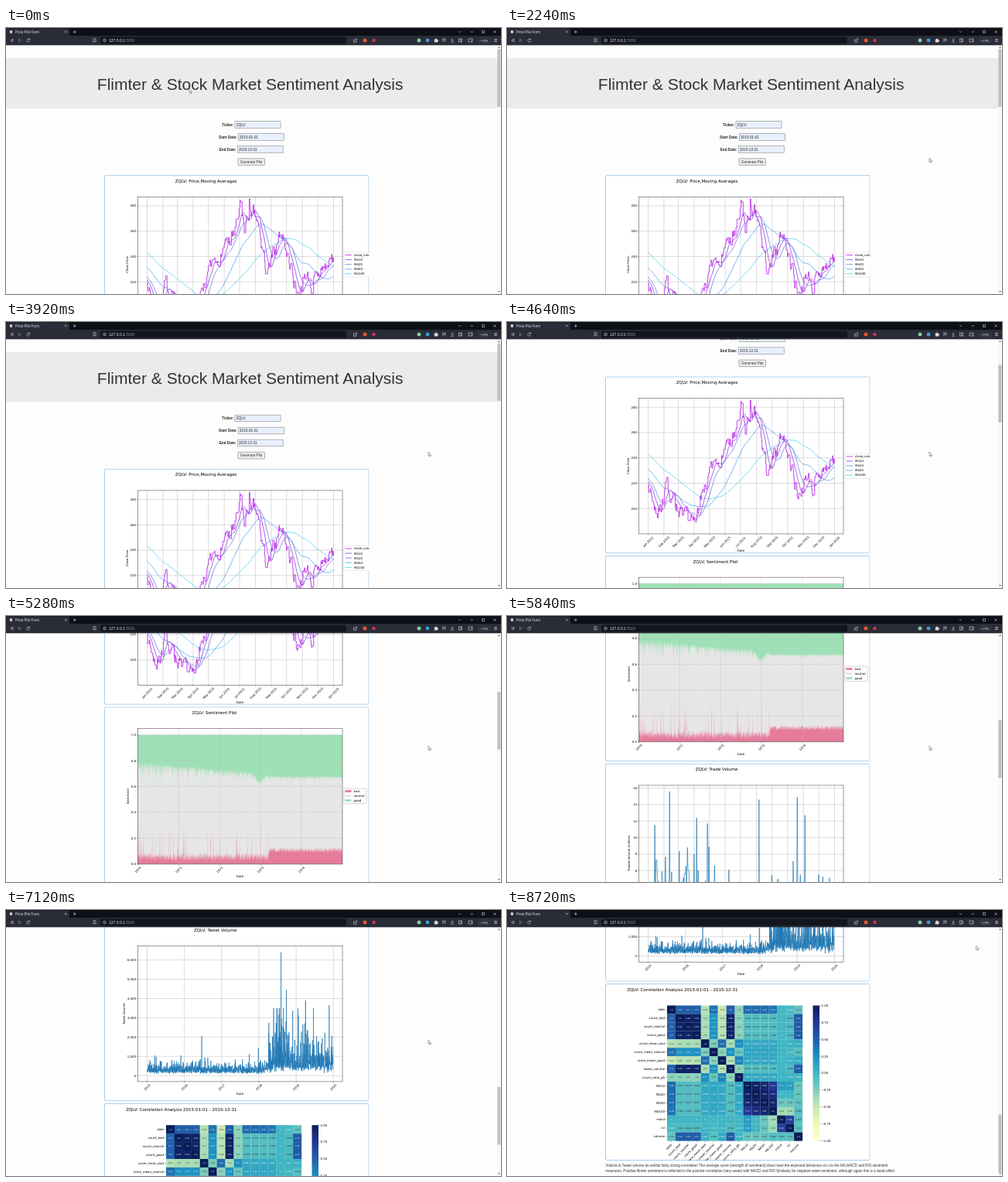
Write an HTML page that moves like this. It is 640 px wide and 344 px high and loops after 8800 ms.

```html
<!DOCTYPE html>
<html lang="en">
<head>
<meta charset="utf-8">
<title>Price Plot Form</title>
<style>
  @property --scroll { syntax: "<number>"; inherits: true; initial-value: 0; }
  html, body { margin: 0; width: 100%; height: 100%; overflow: hidden; background: #fdfdfd; }
  svg { display: block; width: 640px; height: 344px; animation: scroll 8.8s linear infinite; }
  text { font-family: "Liberation Sans", Arial, sans-serif; white-space: pre; }
  .plot text { font-family: "DejaVu Sans", sans-serif; }
  #page { transform: translateY(calc(var(--scroll) * -1px)); }
  #thumb { transform: translateY(calc(var(--scroll) * .2325px)); }
  #cursor { animation: cursor 8.8s linear infinite; }
  .line { fill: none; stroke-linejoin: round; }
  @keyframes scroll {
    0%, 25.8% { --scroll: 0; animation-timing-function: ease-in-out; }
    34.8% { --scroll: 240; animation-timing-function: ease-in-out; }
    44.55% { --scroll: .5; animation-timing-function: cubic-bezier(.3, 0, .6, .5); }
    60% { --scroll: 304; }
    66.36% { --scroll: 462; }
    80.91% { --scroll: 866; }
    86.4%, 100% { --scroll: 1021; }
  }
  @keyframes cursor {
    0%, 1.8% { transform: translate(237px, 78.5px); animation-timing-function: ease-in-out; }
    9.1%, 11.4% { transform: translate(420px, 140px); animation-timing-function: ease-in-out; }
    15%, 91% { transform: translate(546px, 168px); animation-timing-function: ease-in-out; }
    99%, 100% { transform: translate(606.5px, 46px); }
  }
</style>
</head>
<body>
<svg viewBox="0 0 640 344">
  <rect width="640" height="344" fill="#fdfdfd"/>
  <g id="page"></g>

  <rect x="635" y="22" width="5" height="322" fill="#f8f8f8"/>
  <rect id="thumb" x="635.3" y="27.5" width="4.2" height="74.5" fill="#c1c1c1"/>
  <path d="M636 26l1.5-2 1.5 2zM636 340l1.5 2 1.5-2z" fill="#777"/>

  <g id="browser">
    <rect width="640" height="22.3" fill="#2a2c38"/>
    <rect width="640" height="10" fill="#0e1017"/>
    <path d="M0 10V2q0-1.5 1.5-1.5h79q1.5 0 1.5 1.5v8z" fill="#2a2c38"/>
    <rect x="122" y="11.6" width="318" height="8.8" rx="1.5" fill="#14161e"/>
    <circle cx="6.5" cy="5" r="1.9" fill="#ccd0d6"/>
    <text x="12" y="6.8" font-size="4.5" fill="#e4e6ea">Price Plot Form</text>
    <text x="133" y="17.8" font-size="5" fill="#eceef2">127.0.0.1<tspan fill="#868b94">:5000</tspan></text>
    <g fill="none" stroke="#d5d8de" stroke-width=".6">
      <path d="M76 3.7l2.5 2.5m0-2.5l-2.5 2.5M86.7 5h4.2m-2.1-2.1v4.2"/>
      <path d="M9 14v4l-3.2-2z"/>
      <path d="M16.5 14v4l3.2-2z" stroke="#8b909a"/>
      <path d="M30.5 15a2 2 0 1 0 .2 1.8m0-3.3v1.7H29"/>
      <path d="M113 13.8h3v4.4l-1.5-1.2-1.5 1.2z"/>
      <circle cx="127.5" cy="16" r="1.9"/><path d="M127.5 15.6v1.4"/>
      <path d="M451 15h-1.5v3.2h3.5v-2M451 16.5l2.5-2.5h-1.5m1.5 0v1.5"/>
      <path d="M564 14h4m-4 1.7h4m-4 1.7h2.2M568 14v3.4"/>
      <path d="M577 13.5v3m-1.4-1.3l1.4 1.4 1.4-1.4M574.8 18.2h4.4"/>
      <rect x="585.5" y="14" width="4" height="4"/><path d="M588 14v4"/>
      <rect x="598" y="14" width="5" height="4"/><path d="M601 16h2"/>
      <rect x="610.5" y="13" width="16" height="6" rx="2.5" stroke="#4b505a"/>
      <path d="M631 14.5h4m-4 1.5h4m-4 1.5h4"/>
      <path d="M585 4.2l1.5 1.5 1.5-1.5M600.5 5h3.5M615.5 3.5h3v3h-3zM630.5 3.5l3 3m0-3l-3 3"/>
    </g>
    <text x="612.5" y="17.5" font-size="4" fill="#e4e6ea">• VPN</text>
    <circle cx="464" cy="16" r="2.5" fill="#e8562e"/>
    <circle cx="475.5" cy="16" r="2.3" fill="#c63a4a"/>
    <circle cx="534" cy="16" r="2.5" fill="#86c9a0"/>
    <circle cx="545" cy="16" r="2.4" fill="#3e9bd8"/>
    <path d="M553.8 14.6h1.3a.8.8 0 1 1 1.5 0h1.4v1.2a.8.8 0 1 1 0 1.3v1.3h-4.2z" fill="#d5d8de"/>
  </g>
  <path id="cursor" d="M0 0v5.4l1.3-1.1.9 1.9.8-.4-.9-1.8h1.7z" fill="#fff" stroke="#222" stroke-width=".4"/>
</svg>

<script>
const LEFT = 170.5, RIGHT = 435, TOP = 27.4, BOTTOM = 202.7;
const DATA_LEFT = 182.5, YEAR = 241;
const TICKER = "ZQLV";
const BLUE = "#1f77b4";

let seed = 7;
function random() {
  seed = (seed + 0x6D2B79F5) | 0;
  let t = Math.imul(seed ^ (seed >>> 15), 1 | seed);
  t = (t + Math.imul(t ^ (t >>> 7), 61 | t)) ^ t;
  return ((t ^ (t >>> 14)) >>> 0) / 4294967296;
}
const burst = () => -Math.log(1 - random());
const clamp = (v, min, max) => Math.min(max, Math.max(min, v));
const range = (n, f) => Array.from({ length: n }, (_, i) => f(i));

function interpolate(points, x) {
  const i = clamp(points.findIndex(p => p[0] > x), 1, points.length - 1);
  const [[x0, y0], [x1, y1]] = x >= points.at(-1)[0] ? points.slice(-2) : [points[i - 1], points[i]];
  return y0 + (y1 - y0) * (x - x0) / (x1 - x0);
}

const text = (x, y, s, size = 3.93, attrs = "") =>
  `<text x="${x}" y="${y}" font-size="${size}" ${attrs}>${s}</text>`;
const turned = (x, y, s, angle, anchor = "middle") =>
  text(0, 1.4, s, 3.93, `text-anchor="${anchor}" transform="translate(${x} ${y}) rotate(${angle})"`);
const rect = (x, y, w, h, fill, attrs = "") =>
  `<rect x="${x}" y="${y}" width="${w}" height="${h}" fill="${fill}" ${attrs}/>`;
const stroke = (d, color, width, attrs = "") =>
  `<path class="line" d="${d}" stroke="${color}" stroke-width="${width}" ${attrs}/>`;
const polyline = pts => "M" + pts.map(([x, y]) => x.toFixed(2) + " " + y.toFixed(2)).join("L");

function card(index, title, content) {
  return `<g class="plot" transform="translate(0 ${191 + 231.5 * index})" clip-path="url(#card)">
    ${rect(127.5, -.3, 341.5, 227.8, "#fff", 'rx="1.5" stroke="#7fb8ee" stroke-width=".7"')}
    ${text(298.5, 8.9, `${TICKER}: ${title}`, 5.5, 'text-anchor="end"')}${content}</g>`;
}

function axes({ xTicks, yTicks, yLabel, labelX = 157, xTickY, dateY, under = "", over = "", dash = "" }) {
  const grid = xTicks.map(([x]) => `M${x} ${TOP}V${BOTTOM}`).join("") +
               yTicks.map(([y]) => `M${LEFT} ${y}H${RIGHT}`).join("");
  const marks = xTicks.map(([x]) => `M${x} ${BOTTOM}v1.4`).join("") +
                yTicks.map(([y]) => `M${LEFT} ${y}h-1.4`).join("");
  return under + stroke(grid, "#b8b8b8", .5, `stroke-dasharray="${dash}"`) +
    `<g clip-path="url(#axes)">${over}</g>` + stroke(marks, "#222", .4) +
    rect(LEFT, TOP, RIGHT - LEFT, BOTTOM - TOP, "none", 'stroke="#333" stroke-width=".5"') +
    xTicks.map(([x, s]) => turned(x, xTickY, s, -45)).join("") +
    yTicks.map(([y, s]) => text(168, y + 1.4, s, 3.93, 'text-anchor="end"')).join("") +
    turned(labelX, 115, yLabel, -90) + text(302.5, dateY, "Date", 3.93, 'text-anchor="middle"');
}

const dayX = d => DATA_LEFT + YEAR * d / 365;
const isWeekend = d => [2, 3].includes((d + 154) % 7);
const months = range(13, m => {
  const date = new Date(Date.UTC(2015, m, 1));
  const day = (date - Date.UTC(2015, 0, 1)) / 864e5;
  const name = date.toLocaleString("en", { month: "short", timeZone: "UTC" });
  return [+dayX(day).toFixed(2), `${name} ${date.getUTCFullYear()}`];
});

function priceChart() {
  const turns = [[-150, 269], [0, 219], [18, 195], [37, 218], [67, 194], [88, 187], [131, 238], [170, 257],
    [182, 278], [190, 259], [200, 280], [216, 264], [235, 224], [262, 262], [294, 210], [312, 226],
    [322, 215], [340, 229], [365, 238]];
  const history = 150, close = [];
  let wobble = 0;
  for (let d = -history; d <= 365; d++) {
    if (d > 0) wobble = wobble * .65 + (random() - .5) * 10;
    close.push(isWeekend(d) && close.length ? close.at(-1) : interpolate(turns, d) + wobble);
  }
  const y = v => 39 + (280 - v) * 1.637;
  const average = n => polyline(range(366, d => {
    const part = close.slice(d + history - n + 1, d + history + 1);
    return [dayX(d), y(part.reduce((a, b) => a + b) / n)];
  }));
  const steps = `M${DATA_LEFT} ${y(219)}` +
    range(366, d => `H${dayX(d).toFixed(2)}V${y(close[d + history]).toFixed(2)}`).join("");
  const series = [["close_value", "#b31be8", steps], ["MA10", "#8a3fdc", average(15)],
    ["MA20", "#6f74e4", average(29)], ["MA50", "#4a9fee", average(73)], ["MA100", "#45cdf0", average(145)]];
  const legend = rect(437, 99, 40, 32, "#fff", 'stroke="#ccc" stroke-width=".4"') +
    series.map(([name, color], i) => stroke(`M438.5 ${102.6 + i * 6.05}h8.5`, color, .8) +
      text(450, 104 + i * 6.05, name)).join("");
  return axes({
    xTicks: months, yTicks: range(5, i => [39 + i * 32.75, 280 - 20 * i]), yLabel: "Close Price",
    xTickY: 213, dateY: 226, over: series.map(([, color, d]) => stroke(d, color, .8)).reverse().join("")
  }) + legend;
}

function sentimentChart() {
  const y = v => 202.5 - v * 167;
  const good = [], bad = [];
  for (let x = LEFT; x <= RIGHT; x += .15) {
    const t = (x - LEFT) / (RIGHT - LEFT), calm = t > .64;
    const wild = calm ? .012 : .04 - .03 * t;
    const dip = .06 * Math.exp(-(((x - 328) / 6) ** 2));
    const level = calm ? .68 : .79 - .14 * t;
    good.push([x, y(level - dip - burst() * wild)]);
    const spike = !calm && random() < .07 * (1 - t) ? random() * .3 : 0;
    bad.push([x, y((calm ? .085 : .02) + random() * (calm ? .045 : .07) + spike)]);
  }
  const area = (pts, edge) => `${polyline(pts)}L${RIGHT} ${edge}H${LEFT}z`;
  const under = rect(LEFT, 35.5, RIGHT - LEFT, 167, "#e6e6e6") +
    `<path d="${area(good, 35.5)}" fill="#9fe0b6"/><path d="${area(bad, 202.5)}" fill="#e67b9b"/>`;
  const entries = [["bad", "#e67b9b"], ["neutral", "#e6e6e6"], ["good", "#9fe0b6"]];
  return axes({
    under, dash: "2 1", xTicks: range(5, i => [LEFT + i * 52.85, 1970 + i]),
    yTicks: range(6, i => [y(i / 5), (i / 5).toFixed(1)]), yLabel: "Sentiment", labelX: 157.5,
    xTickY: 210, dateY: 219.8
  }) + rect(437, 105, 29, 19.5, "#fff", 'rx="1" stroke="#aaa" stroke-width=".5"') +
    entries.map(([name, color], i) => rect(438.5, 107 + i * 6, 8, 2.8, color) +
      text(449.5, 109.8 + i * 6, name)).join("");
}

const peakAt = (peaks, x, reach) => peaks.find(([px]) => Math.abs(px - x) <= reach)?.[1] ?? 0;

function tradeChart() {
  const peaks = [[190.8, 11.5], [210, 15.6], [245, 12.4], [259, 11.7], [325.8, 14.6], [375.2, 14.9], [385, 12.7]];
  const y = v => 31 + (16 - v) * 10.67;
  let base = 3;
  const points = range(365, d => {
    const busy = d < 130 ? 1.5 : 1;
    if (!isWeekend(d)) base = Math.min(10, 1.8 + burst() * 1.1 * busy);
    return [dayX(d), y(Math.max(base, peakAt(peaks, dayX(d), .34)))];
  });
  return axes({
    xTicks: months, yTicks: range(9, i => [y(i * 2), i * 2]), yLabel: "Traded Volume (million)",
    labelX: 158, xTickY: 213, dateY: 226, over: stroke(polyline(points), BLUE, .7)
  });
}

function postChart() {
  const peaks = [[253, 2050], [355.6, 6400], [362.5, 4450], [387.3, 3900], [417.8, 3650]];
  const y = v => 195 - v * .02492;
  const points = [];
  for (let x = DATA_LEFT; x <= 423; x += .14) {
    const rise = clamp((x - 329) / 18, 0, 1);
    const hype = 1 + .5 * Math.exp(-(((x - 358) / 8) ** 2));
    const v = 90 + 250 * random() + rise * 350 * random() + burst() ** 1.3 * (90 + 270 * rise) * hype;
    points.push([x, y(Math.max(Math.min(v, 3500), peakAt(peaks, x, .07)))]);
  }
  return axes({
    xTicks: range(6, i => [DATA_LEFT + i * 48.15, 2015 + i]),
    yTicks: range(7, i => [y(i * 1000), (i * 1000).toLocaleString("en")]), yLabel: "Tweet Volume",
    labelX: 152.5, xTickY: 210, dateY: 219.8, over: stroke(polyline(points), BLUE, .65)
  });
}

function correlationChart() {
  // weights on activity, price trend, momentum and drift over time
  const counts = [.97, -.08];
  const factors = {
    date: [.55, .45, 0, .6], count_bad: counts, count_neutral: counts, count_good: counts,
    score_mean_bad: [-.4, .1, 0, -.45], score_mean_neutral: [.26, .12, 0, .35],
    score_mean_good: [-.45, .1, 0, -.55], tweet_volume: counts, count_ratio_gb: [-.3, .1, 0, -.3],
    MA10: [0, .97, .2], MA20: [0, .98], MA50: [0, .96, -.2], MA100: [0, .85, -.45],
    macd: [0, 0, .85], rsi: [-.05, 0, .8], volume: [.52, -.15, -.1, -.6]
  };
  const names = Object.keys(factors);
  const correlation = (a, b) => a === b ? 1
    : factors[a].reduce((sum, w, i) => sum + w * (factors[b][i] ?? 0), 0);
  const stops = ["ffffd9", "edf8b1", "c7e9b4", "7fcdbb", "41b6c4", "1d91c0", "225ea8", "253494", "081d58"];
  const channels = hex => [0, 2, 4].map(i => parseInt(hex.slice(i, i + 2), 16));
  const color = v => {
    const t = (v + 1) * 4, i = Math.min(7, Math.floor(t)), a = channels(stops[i]), b = channels(stops[i + 1]);
    return `rgb(${a.map((c, k) => Math.round(c + (b[k] - c) * (t - i)))})`;
  };
  const x0 = 207, y0 = 27.5, size = 10.94;
  let out = "";
  names.forEach((name, r) => {
    const middle = y0 + (r + .5) * size, center = x0 + (r + .5) * size;
    out += text(204, middle + 1.3, name, 3.93, 'text-anchor="end"') + turned(center, 207, name, -45, "end") +
      stroke(`M207 ${middle}h-1.5M${center} 202.5v1.5`, "#222", .4);
    names.forEach((other, c) => {
      const v = correlation(name, other);
      const label = v === 1 ? "1.0" : +v.toFixed(Math.abs(v) < .1 ? 3 : 2);
      out += rect(x0 + c * size, y0 + r * size, size + .1, size + .1, color(v)) +
        text(x0 + (c + .5) * size, middle + .9, label, 2.6,
          `text-anchor="middle" fill="${v < -.03 ? "#262626" : "#fff"}"`);
    });
  });
  const gradient = stops.map((s, i) => `<stop offset="${i / 8}" stop-color="#${s}"/>`).join("");
  return out + `<linearGradient id="scale" x1="0" y1="1" x2="0" y2="0">${gradient}</linearGradient>` +
    rect(395.5, y0, 8.5, 175, "url(#scale)") +
    range(9, i => stroke(`M404 ${y0 + i * 21.875}h1.4`, "#222", .4) +
      text(406.5, y0 + 1.4 + i * 21.875, (1 - i / 4).toFixed(2).replace("-", "−"))).join("");
}

function formRow(label, value, x, y) {
  return text(x - 1.7, y + 6.2, label, 4.67, 'text-anchor="end" font-weight="bold" fill="#222"') +
    rect(x, y, 59, 8.6, "#e8f0fe", 'stroke="#858585" stroke-width=".6"') +
    text(x + 1.7, y + 6.1, value, 4.67, 'fill="#222"');
}

document.getElementById("page").innerHTML = `
  <clipPath id="axes">${rect(LEFT, TOP, RIGHT - LEFT, BOTTOM - TOP, "#000")}</clipPath>
  <clipPath id="card">${rect(127, -1, 342.4, 229, "#000")}</clipPath>
  ${rect(0, 39, 635, 65, "#ebebeb")}
  ${text(513.5, 80.3, "Flimter &amp; Stock Market Sentiment Analysis", 21, 'text-anchor="end" fill="#333"')}
  ${formRow("Ticker:", TICKER, 296, 120.7)}
  ${formRow("Start Date:", "2015-01-01", 300.3, 136.7)}
  ${formRow("End Date:", "2015-12-31", 299.2, 152.6)}
  ${rect(300, 168.8, 34.5, 8.6, "#efefef", 'rx=".8" stroke="#777" stroke-width=".6"')}
  ${text(317.2, 174.7, "Generate Plot", 4.67, 'text-anchor="middle" fill="#333"')}
  ${card(0, "Price,Moving Averages", priceChart())}
  ${card(1, "Sentiment Plot", sentimentChart())}
  ${card(2, "Trade Volume", tradeChart())}
  ${card(3, "Tweet Volume", postChart())}
  ${card(4, "Correlation Analysis 2015-01-01 - 2015-12-31", correlationChart())}
  ${text(127.3, 1353.2, "Volume &amp; Tweet volume do exhibit fairly strong correlation The average score (strength of sentiment) does have the expected behaviour w.r.t to the MA,MACD and RSI sentiment", 4.67, 'fill="#333"')}
  ${text(127.3, 1359.8, "measures. Positive flimter sentiment is reflected in the positive correlation (very weak) with MACD and RSI Similarity for negative tweet sentiment, although again this is a weak effect", 4.67, 'fill="#333"')}`;
</script>
</body>
</html>
```
